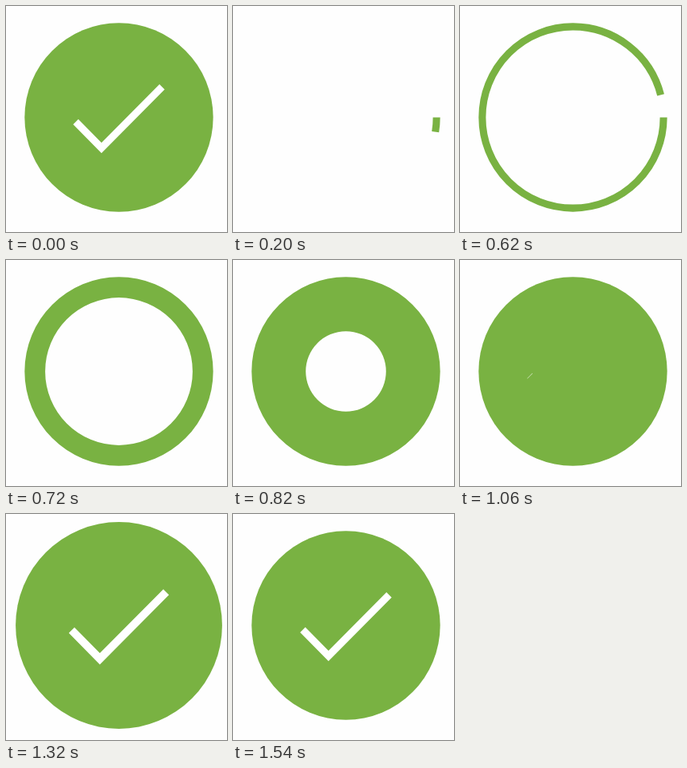
An HTML page with a canvas for the animation above (1880 ms loop, 277 by 283 pixels).

```html
<!DOCTYPE html>
<html lang="en">
<head>
<meta charset="utf-8">
<title>Success check</title>
<style>
  html, body { margin: 0; width: 100%; height: 100%; overflow: hidden; background: #fefefe; }
  canvas { display: block; }
</style>
</head>
<body>
<canvas id="stage" width="277" height="283"></canvas>
<script>
const ctx = document.getElementById('stage').getContext('2d');
const LOOP = 1880, STEP = 20;
const GREEN = '#79b242', WHITE = '#fefefe';
const CENTER = { x: 141.5, y: 139.5 };
const UNIT = 4.545;               // pixels per icon unit; the icon is 52 units wide
const RADIUS = 26, RING = 25, STROKE = 2;
const FILL_DEPTH = 27.86, RING_DASH = 166, CHECK_DASH = 48;

const clamp = v => Math.min(1, Math.max(0, v));
const progress = (t, start, duration) => clamp((t - start) / duration);

// Cubic Bézier easing with control points (x1, 0) and (x2, 1)
function bezier(x1, x2) {
  return x => {
    if (x <= 0 || x >= 1) return clamp(x);
    let lo = 0, hi = 1;
    for (let i = 0; i < 24; i++) {
      const s = (lo + hi) / 2, r = 1 - s;
      if (3 * r * r * s * x1 + 3 * r * s * s * x2 + s * s * s < x) lo = s;
      else hi = s;
    }
    return lo * lo * (3 - 2 * lo);
  };
}
const drawEase = bezier(0.65, 0.45);
const easeInOut = bezier(0.42, 0.58);

function drawRing(length) {
  const angle = Math.min(length / RING, 2 * Math.PI);
  if (angle <= 0) return;
  ctx.strokeStyle = GREEN;
  ctx.beginPath();
  ctx.arc(0, 0, RING, 0, angle);
  ctx.stroke();
}

function drawDisc(hole) {
  ctx.fillStyle = GREEN;
  ctx.beginPath();
  ctx.arc(0, 0, RADIUS, 0, 2 * Math.PI);
  if (hole > 0) {
    ctx.moveTo(hole, 0);
    ctx.arc(0, 0, hole, 0, 2 * Math.PI, true);
  }
  ctx.fill();
}

function drawCheck(length) {
  if (length <= 0) return;
  ctx.strokeStyle = '#fff';
  ctx.setLineDash([length, 100]);
  ctx.beginPath();
  ctx.moveTo(-11.9, 1.2);
  ctx.lineTo(-4.8, 8.4);
  ctx.lineTo(11.9, -8.4);
  ctx.stroke();
  ctx.setLineDash([]);
}

function render(time) {
  // The loop opens on one step of the finished icon
  const t = time < STEP ? LOOP : time;
  const ring = RING_DASH * drawEase(progress(t, 88, 700));
  const depth = FILL_DEPTH * easeInOut(progress(t, 570, 480));
  const check = CHECK_DASH * drawEase(progress(t, 1042, 360));
  const pulse = progress(t, 1168, 360);
  const scale = 1 + 0.1 * easeInOut(1 - Math.abs(2 * pulse - 1));

  ctx.setTransform(1, 0, 0, 1, 0, 0);
  ctx.fillStyle = WHITE;
  ctx.fillRect(0, 0, 277, 283);
  ctx.translate(CENTER.x, CENTER.y);
  ctx.scale(UNIT * scale, UNIT * scale);
  ctx.lineWidth = STROKE;

  if (depth > STROKE) drawDisc(RADIUS - depth);
  else drawRing(ring);
  drawCheck(check);
}

const origin = performance.now();
function tick() {
  const time = (performance.now() - origin) % LOOP;
  render(Math.floor(time / STEP) * STEP);
  requestAnimationFrame(tick);
}
tick();
</script>
</body>
</html>
```
